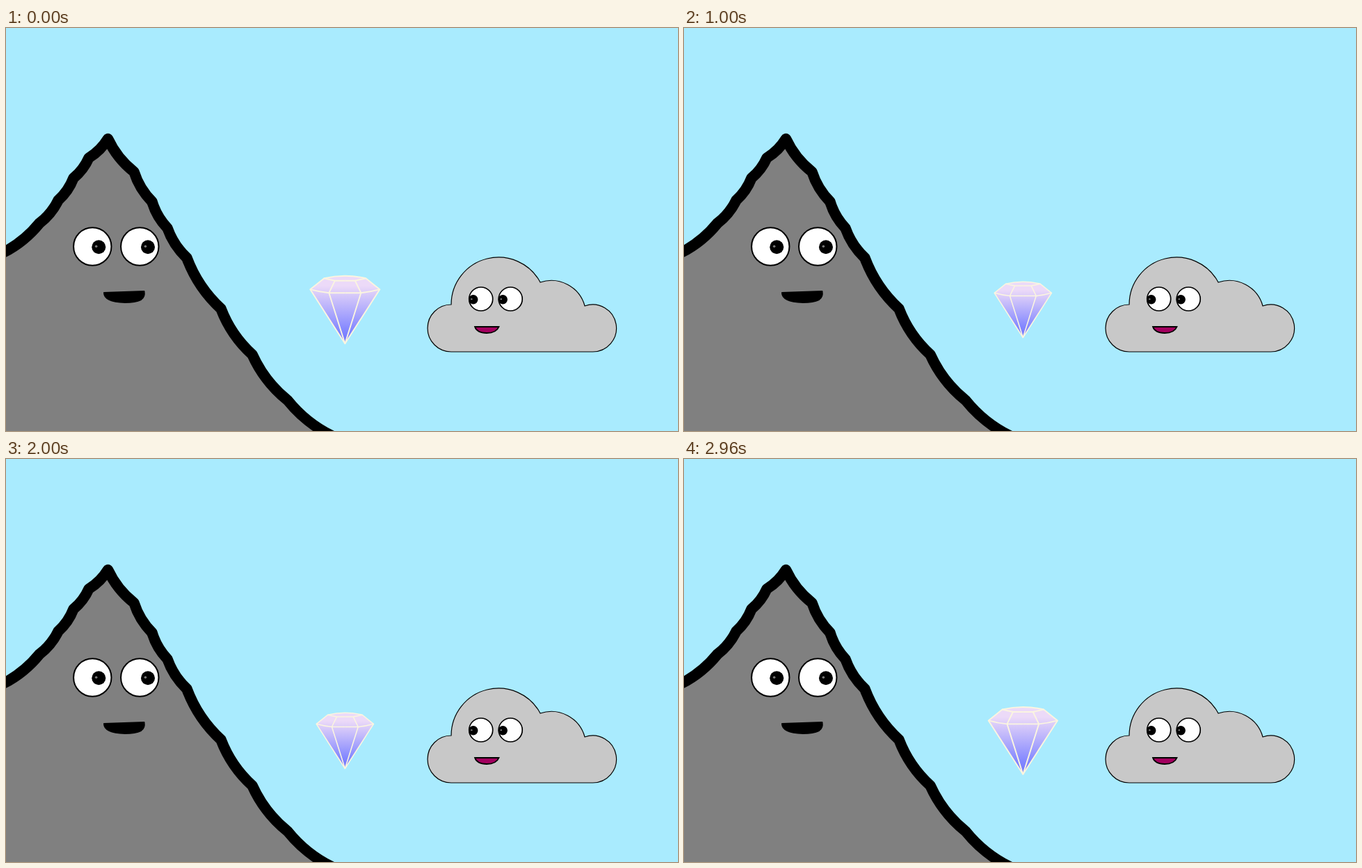
An HTML page that plays this animation: 966x580 px, repeating every 3000 ms.

```html
<!DOCTYPE html>
<html lang="en">
<head>
<meta charset="utf-8">
<title>Mountain, diamond and cloud</title>
<style>
html, body { margin: 0; width: 100%; height: 100%; overflow: hidden; background: #a9ebfe; }
svg { display: block; width: 966px; height: 580px; }
</style>
</head>
<body>
<svg viewBox="0 0 966 580">
  <defs>
    <linearGradient id="shine" gradientUnits="userSpaceOnUse" x1="0" y1="-49" x2="0" y2="49">
      <stop offset=".15" stop-color="#ecdaf8"/>
      <stop offset=".8" stop-color="#8488ff"/>
      <stop offset="1" stop-color="#7074ff"/>
    </linearGradient>
  </defs>

  <path id="mountain" fill="#808080" stroke="#000" stroke-width="15.5" stroke-linejoin="round"/>
  <path d="M141 381 L198.500 379 Q200 387 194 391 Q186 395 171 395 Q141 394 141 381Z" stroke="#000" stroke-width="2" stroke-linejoin="round"/>

  <path d="M640 466 A34 34 0 0 1 640 398 A68 68 0 0 1 768 366 A50 50 0 0 1 832 400 A34 34 0 1 1 843 466Z" fill="#c8c8c8" stroke="#000" stroke-width="1.2"/>
  <path d="M674 430 H708.5 Q705 439 691 439 Q677 439 674 430Z" fill="#a3005f" stroke="#000" stroke-width="1.8"/>

  <g id="eyes"></g>

  <g id="diamond" fill="none" stroke="#fbf5e0" stroke-width="1.9" stroke-linejoin="round">
    <path fill="url(#shine)" d="M-50 -29 L-30 -45 Q0 -52 30 -45 L50 -29 L0 49Z"/>
    <path id="facets" d="M50 -29 Q36 -25 23 -24 H0 M30 -45 L14.500 -41.500 H0 M14.500 -41.500 L23 -24 L0 49"/>
    <use href="#facets" transform="scale(-1 1)"/>
  </g>
</svg>
<script>
const LOOP = 3000, STEP = 40, SHRINK = 0.267;
const $ = id => document.getElementById(id);

// The outline runs from crag to crag, each span sagging into the rock.
const crags = [
  [-12, 327], [48, 281], [75, 248], [97, 216], [119, 187], [146.5, 159.5], [184, 207],
  [210, 250], [232, 288], [260, 331], [309, 404], [354, 470], [405, 536], [475, 590]
];
const SAG = 0.12;
const spans = crags.slice(1).map(([x, y], i) => {
  const [px, py] = crags[i];
  const cx = (px + x) / 2 - (y - py) * SAG;
  const cy = (py + y) / 2 + (x - px) * SAG;
  return `Q${cx} ${cy} ${x} ${y}`;
});
$("mountain").setAttribute("d", `M${crags[0]}${spans.join("")}V620H-20V327Z`);

function eye(x, y, r, look, pupil, line) {
  const px = x + look, py = y + 0.8;
  $("eyes").innerHTML += `
    <circle cx="${x}" cy="${y}" r="${r}" fill="#fff" stroke="#000" stroke-width="${line}"/>
    <circle cx="${px}" cy="${py}" r="${pupil}"/>
    <circle cx="${px - pupil * 0.36}" cy="${py - pupil * 0.1}" r="${pupil * 0.18}" fill="#777"/>`;
}
for (const [x, look] of [[124.3, 9], [192.3, 11.7]]) eye(x, 314.5, 27.2, look, 10, 2);
for (const x of [682.7, 725.2]) eye(x, 390, 17, -11, 6.7, 1.7);

const start = performance.now();

function draw(now) {
  const t = Math.floor(Math.max(0, now - start) % LOOP / STEP) * STEP;
  const away = 1 - Math.abs(t / (LOOP / 2) - 1);
  $("diamond").setAttribute("transform", `translate(487.3 405.2) scale(${1 - SHRINK * away})`);
  requestAnimationFrame(draw);
}
draw(start);
</script>
</body>
</html>
```
